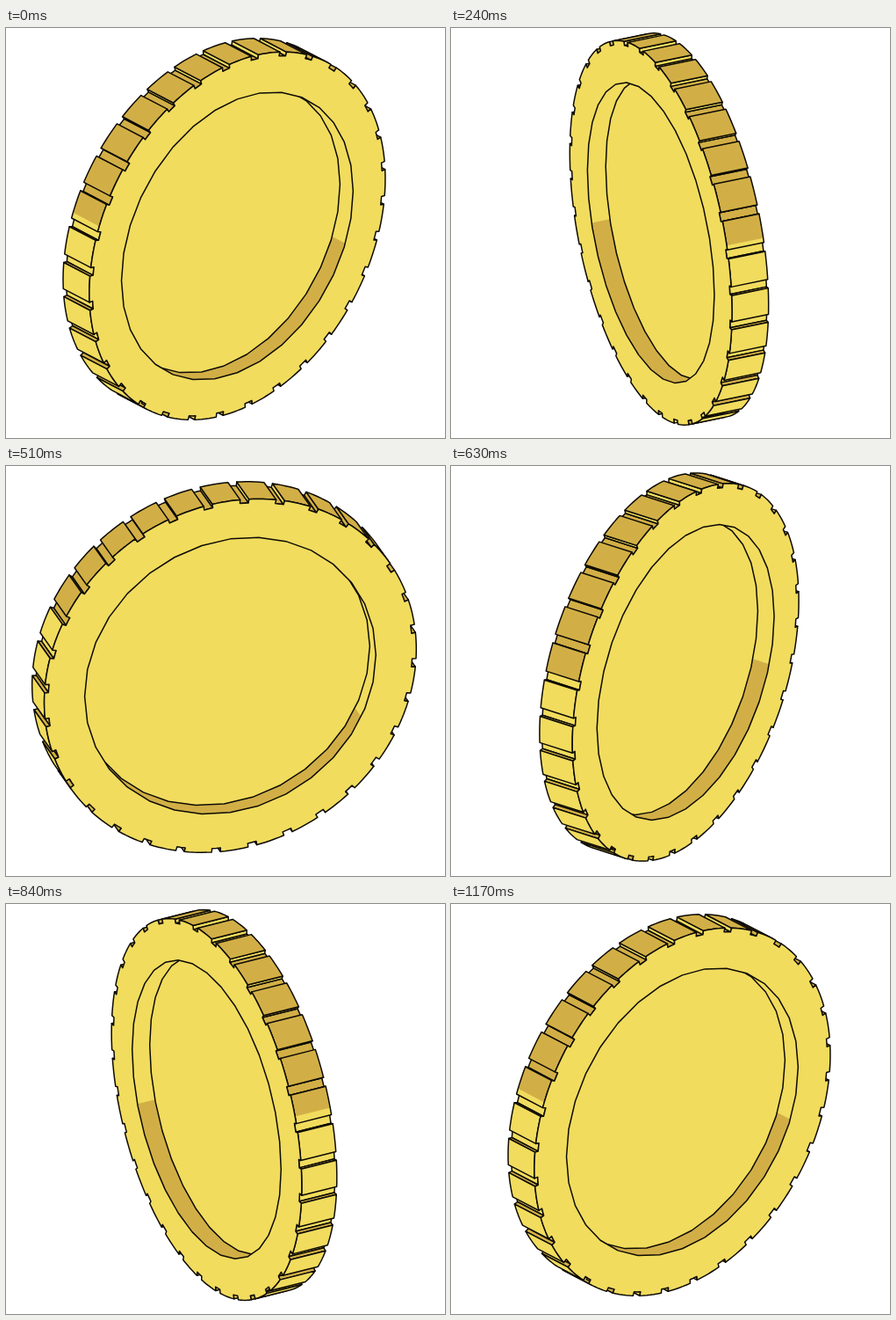
An HTML page with a canvas that plays this animation: 500 by 466 pixels, repeating every 1.2 s.

```html
<!DOCTYPE html>
<html lang="en">
<head>
<meta charset="utf-8">
<title>Spinning coin</title>
<style>
html, body { margin: 0; overflow: hidden; background: #fff; }
canvas { display: block; }
</style>
</head>
<body>
<canvas width="500" height="466"></canvas>
<script>
const ctx = document.querySelector('canvas').getContext('2d');
const { PI, sin, cos, atan2, acos, hypot, min, max } = Math;
const RAD = PI / 180;
const LIGHT = '#f1dc5e', DARK = '#d2af46', INK = '#0c0a04';
const CX = 248.5, CY = 228.5, TILT = 26.7 * RAD;
const OUTER = 222.3, GROOVE = 217.6, RECESS = 174, HALF = 22.9;
const TEETH = 32, PITCH = 2 * PI / TEETH, GAP = 2.7 * RAD, PHASE = 4.4 * RAD;
const FRAME_MS = 30, FRAMES = 40, START = 40.7 * RAD;

let theta, side;

// Coin coordinates (radius, angle, distance along the axis) to the stage.
function project(r, a, w) {
  const u = r * cos(a), v = r * sin(a);
  const depth = u * sin(theta) - w * cos(theta);
  return [CX + u * cos(theta) + w * sin(theta), CY - v * cos(TILT) - depth * sin(TILT)];
}

function arc(r, a, b, w, steps = 6) {
  return Array.from({ length: steps + 1 }, (_, i) => project(r, a + (b - a) * i / steps, w));
}

function poly(points, fill, outlined) {
  ctx.beginPath();
  points.forEach(p => ctx.lineTo(...p));
  ctx.closePath();
  if (fill) { ctx.fillStyle = fill; ctx.fill(); }
  if (outlined) ctx.stroke();
}

// Range of angles where x*cos(a) + y*sin(a) exceeds a limit.
function range(x, y, limit) {
  return { mid: atan2(y, x), half: acos(limit / hypot(x, y)) };
}

function overlap(a, b, { mid, half }) {
  const turn = 2 * PI * Math.round(((a + b) / 2 - mid) / (2 * PI));
  const from = max(a - turn, mid - half), to = min(b - turn, mid + half);
  return from < to ? [from, to] : null;
}

function strip(r, a, b) {
  return [...arc(r, a, b, side * HALF), ...arc(r, b, a, -side * HALF)];
}

function drawBand(r, a, b, visible, dark) {
  const seen = overlap(a, b, visible);
  if (!seen) return;
  poly(strip(r, ...seen), LIGHT);
  const shaded = overlap(...seen, dark);
  if (shaded) poly(strip(r, ...shaded), DARK);
  poly(strip(r, ...seen), null, true);
}

function drawWall(a, normal, visible, dark) {
  const within = ({ mid, half }) => cos(normal - mid) > cos(half);
  if (!within(visible)) return;
  const w = HALF;
  poly([project(OUTER, a, w), project(GROOVE, a, w), project(GROOVE, a, -w), project(OUTER, a, -w)],
    within(dark) ? DARK : LIGHT, true);
}

function drawCoin() {
  side = cos(theta) < 0 ? -1 : 1;
  const visible = range(-sin(theta) * cos(TILT), sin(TILT), 0);
  const dark = range(-.25 * sin(theta) - .05 * cos(theta), 1, .548);
  const teeth = Array.from({ length: TEETH }, (_, i) => {
    const groove = PHASE + i * PITCH;
    return [groove + GAP / 2, groove + PITCH - GAP / 2];
  });

  ctx.fillStyle = '#fff';
  ctx.fillRect(0, 0, 500, 466);
  ctx.strokeStyle = INK;
  ctx.lineWidth = 1.5;
  ctx.lineJoin = 'round';

  for (const [a] of teeth) drawBand(GROOVE, a - GAP, a, visible, dark);
  for (const [a, b] of teeth) {
    drawWall(a, a - PI / 2, visible, dark);
    drawWall(b, b + PI / 2, visible, dark);
  }
  for (const [a, b] of teeth) drawBand(OUTER, a, b, visible, dark);

  const front = side * HALF;
  poly(teeth.flatMap(([a, b]) => [...arc(OUTER, a, b, front), ...arc(GROOVE, b, b + GAP, front, 2)]),
    LIGHT, true);

  const rim = arc(RECESS, 0, 2 * PI, front, 32);
  ctx.save();
  poly(rim);
  ctx.clip();
  const shade = dark.mid + PI;
  poly([...arc(RECESS, shade - dark.half, shade + dark.half, front, 40),
    ...arc(RECESS, shade + dark.half, shade - dark.half, 0, 40)], DARK);
  poly(arc(RECESS, 0, 2 * PI, 0, 32), LIGHT, true);
  ctx.restore();
  poly(rim, null, true);
}

function tick() {
  const step = Math.floor(performance.now() / FRAME_MS) % FRAMES;
  // Both faces are alike, so every half turn repeats the same view.
  const turn = step % (FRAMES - 1) * 2 * PI / (FRAMES - 1);
  theta = START + turn % PI;
  drawCoin();
  requestAnimationFrame(tick);
}
tick();
</script>
</body>
</html>
```
